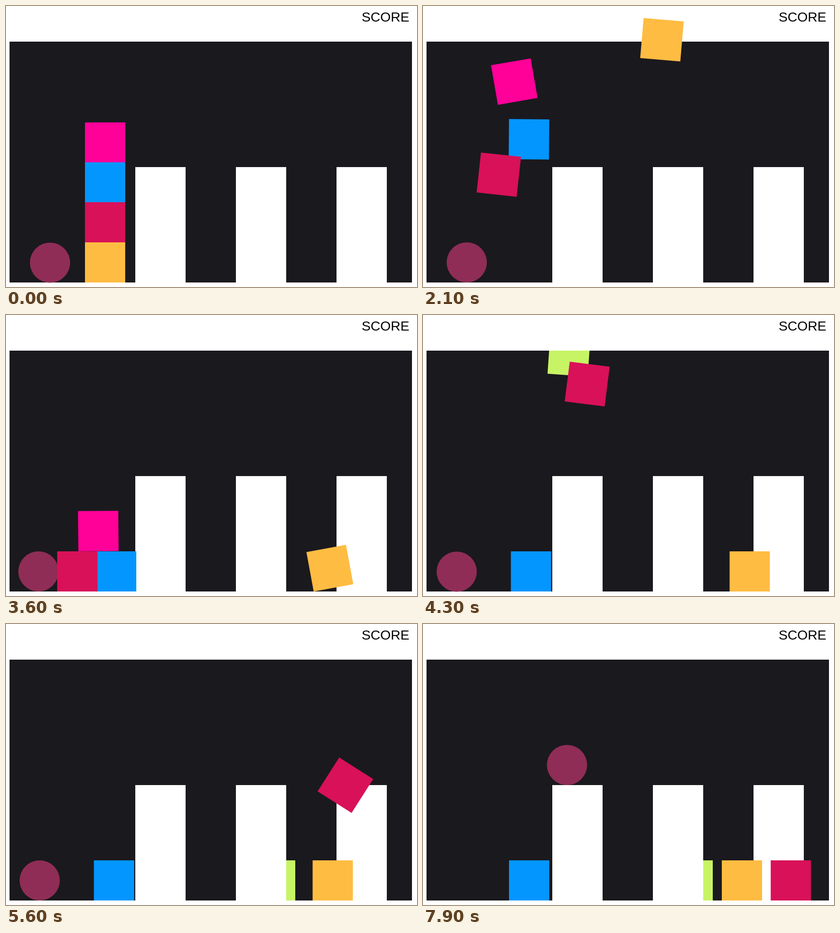
Animation, 817 px wide and 560 px high, one loop 8000 ms. Source, as an HTML page with a canvas:

```html
<!DOCTYPE html>
<html lang="en">
<head>
<meta charset="utf-8">
<title>Falling blocks</title>
<style>
  html, body { margin: 0; width: 100%; height: 100%; overflow: hidden; background: #fff; }
  canvas { display: block; }
</style>
</head>
<body>
<canvas id="stage" width="817" height="560"></canvas>
<script>
const ctx = document.getElementById('stage').getContext('2d');
const LOOP = 8000, SIZE = 80, TOP = 71, SWAP = 3750;

// Keys: [time, x, y, degrees, bend]; bend curves y on the way to that key
// (-1 slows to a peak, 1 falls from a peak, 0 is linear).
const tracks = {
  ball: [
    [0, 87.5, 511.5, 0], [400, 87, 511.5, 0], [2250, 87, 511, 0], [2450, 64.5, 511, 0],
    [3800, 64.5, 511, 0], [4100, 67, 511.5, 0], [5750, 67, 511, 0], [6300, 168, 449, 0, .5],
    [6600, 211, 360, 0], [6850, 230, 290, 0, -.4], [7100, 286.3, 281, 0, -1]
  ],
  top: [
    [1150, 197, 272, 0], [1500, 195, 28, -2], [1600, 194, 22, -3, -1],
    [2480, 172, 419, -15, 1], [2600, 174.7, 423, -11.5], [2760, 183.5, 430.5, -.5, 1],
    [SWAP, 183.5, 430.5, -.5], [4300, 290, 80, 4, -1], [5000, 437.6, 356, 18, 1],
    [5210, 480, 500, 20, .15], [5500, 535, 511, 0], [6300, 535, 511, 0], [6700, 536, 511, 0]
  ],
  blue: [
    [1150, 197, 351.5, 0], [1500, 195.7, 112.3, 1.7], [1560, 197, 111, 2, -1],
    [2430, 219, 511, -.5, 1], [2600, 219, 511, -.4], [3000, 219, 511, 0], [3800, 219, 511, 0],
    [4000, 214.7, 511, 0], [5900, 214.7, 511, 0], [6300, 217.8, 512.5, .5], [6600, 211, 511, 0]
  ],
  red: [
    [1150, 197, 431, 0], [1500, 174.8, 196, 11.2], [1580, 171, 190, 13, -1],
    [2350, 141, 509, 3, 1], [2600, 141, 510, 1.4], [2850, 141.8, 511, 0], [SWAP, 141.8, 511, 0],
    [4670, 450, 66, 12, -1], [5000, 522.8, 97, 19.3, 1], [5400, 630, 218, 28, .4],
    [5850, 730, 495, 38, .3], [6300, 739.7, 504, 10.3], [6440, 731.2, 511, 0, 1]
  ],
  orange: [
    [1150, 197, 511, 0], [1500, 317.2, 266.5, 1.3], [2120, 480, 67, 5, -1],
    [2600, 578, 144, 8, 1], [3100, 638, 503.5, 12, .46], [3350, 641, 501, -14],
    [3600, 643.7, 504.5, -10.5], [3740, 649.5, 511, 0, 1], [5700, 649.5, 511, 0], [5900, 634, 511, 0]
  ]
};

function pose(keys, time) {
  const next = keys.findIndex(key => key[0] > time);
  if (next === 0) return keys[0].slice(1, 4);
  if (next < 0) return keys[keys.length - 1].slice(1, 4);
  const from = keys[next - 1], to = keys[next];
  const u = (time - from[0]) / (to[0] - from[0]);
  const mix = (i, k) => from[i] + (to[i] - from[i]) * k;
  return [mix(1, u), mix(2, u * (1 + (to[4] || 0) * (u - 1))), mix(3, u)];
}

function box(name, color, time) {
  const [x, y, degrees] = pose(tracks[name], time);
  ctx.save();
  ctx.translate(x, y);
  ctx.rotate(degrees * Math.PI / 180);
  ctx.fillStyle = color;
  ctx.fillRect(-SIZE / 2, -SIZE / 2, SIZE, SIZE);
  ctx.restore();
}

function rect(color, x, y, w, h) {
  ctx.fillStyle = color;
  ctx.fillRect(x, y, w, h);
}

function draw(time) {
  rect('#fff', 0, 0, 817, 560);
  rect('#1a191e', 7, TOP, 800, 480);

  // The top block passes behind the header and the pillars.
  box('top', time < SWAP ? '#ff0099' : '#c7f464', time);
  rect('#fff', 0, 0, 817, TOP);
  for (const x of [257, 457, 657]) rect('#fff', x, 321, 100, 230);

  const [x, y] = pose(tracks.ball, time);
  ctx.fillStyle = '#8f2d56';
  ctx.beginPath();
  ctx.arc(x, y, SIZE / 2, 0, 2 * Math.PI);
  ctx.fill();

  box('blue', '#0496ff', time);
  box('red', '#d81159', time);
  box('orange', '#ffbc42', time);

  ctx.fillStyle = '#000';
  ctx.font = '26.67px "Liberation Sans", Arial, sans-serif';
  ctx.fillText('SCORE', 707, 31);
}

function tick() {
  draw(performance.now() % LOOP);
  requestAnimationFrame(tick);
}
tick();
</script>
</body>
</html>
```
